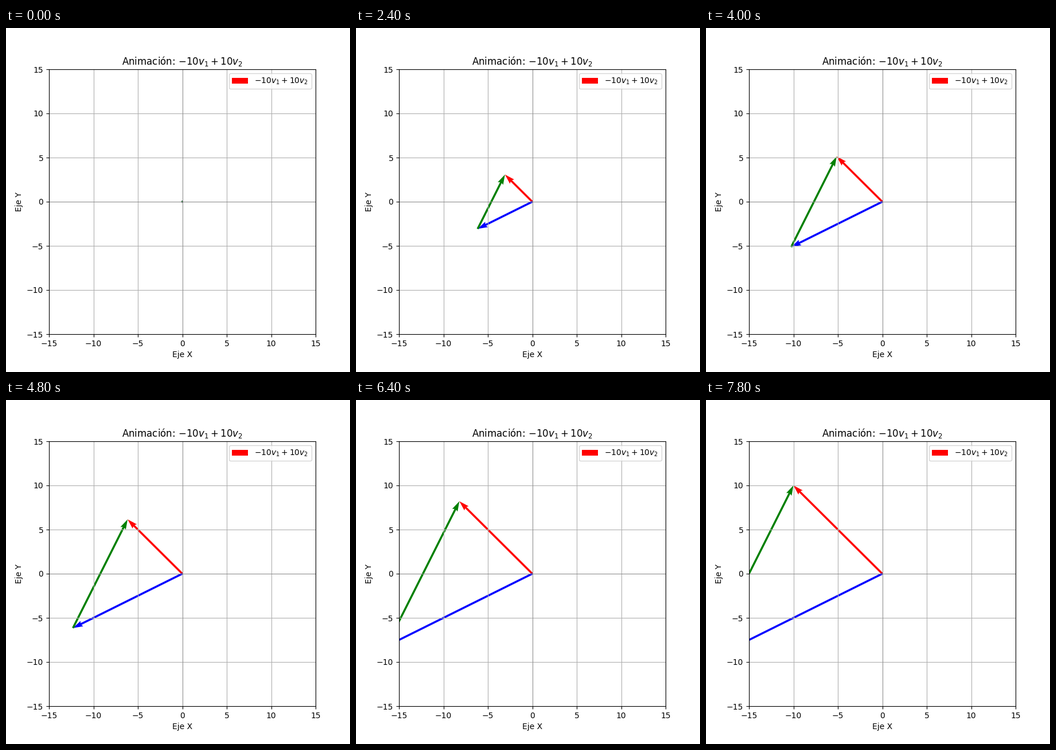
These frames come from a looping animation (600 px wide and 600 px high, 8000 ms). A matplotlib script:

```python
import numpy as np
import matplotlib.pyplot as plt
from matplotlib.animation import FuncAnimation

FRAMES = 40
LIMIT = 15
A, B = -10, 10
V1 = np.array([2, 1])
V2 = np.array([1, 2])
FORMULA = f"${A}v_1 + {B}v_2$"

fig, ax = plt.subplots(figsize=(6, 6), dpi=100)
ax.set_xlim(-LIMIT, LIMIT)
ax.set_ylim(-LIMIT, LIMIT)
ax.axhline(0, color="gray", linewidth=0.5)
ax.axvline(0, color="gray", linewidth=0.5)
ax.grid(True)
ax.set_xlabel("Eje X")
ax.set_ylabel("Eje Y")
ax.set_title(f"Animación: {FORMULA}")


def make_arrow(color, **kwargs):
    return ax.quiver(0, 0, 0, 0, angles="xy", scale_units="xy", scale=1,
                     color=color, **kwargs)


total = make_arrow("red", label=FORMULA)
first = make_arrow("blue")
second = make_arrow("green")
ax.legend(loc="upper right")


def update(i):
    t = i / (FRAMES - 1)
    p = t * A * V1
    q = t * B * V2
    first.set_UVC(*p)
    second.set_offsets([p])
    second.set_UVC(*q)
    total.set_UVC(*(p + q))
    return total, first, second


anim = FuncAnimation(fig, update, frames=FRAMES, interval=200,
                     repeat=True, repeat_delay=0)
plt.show()
```
